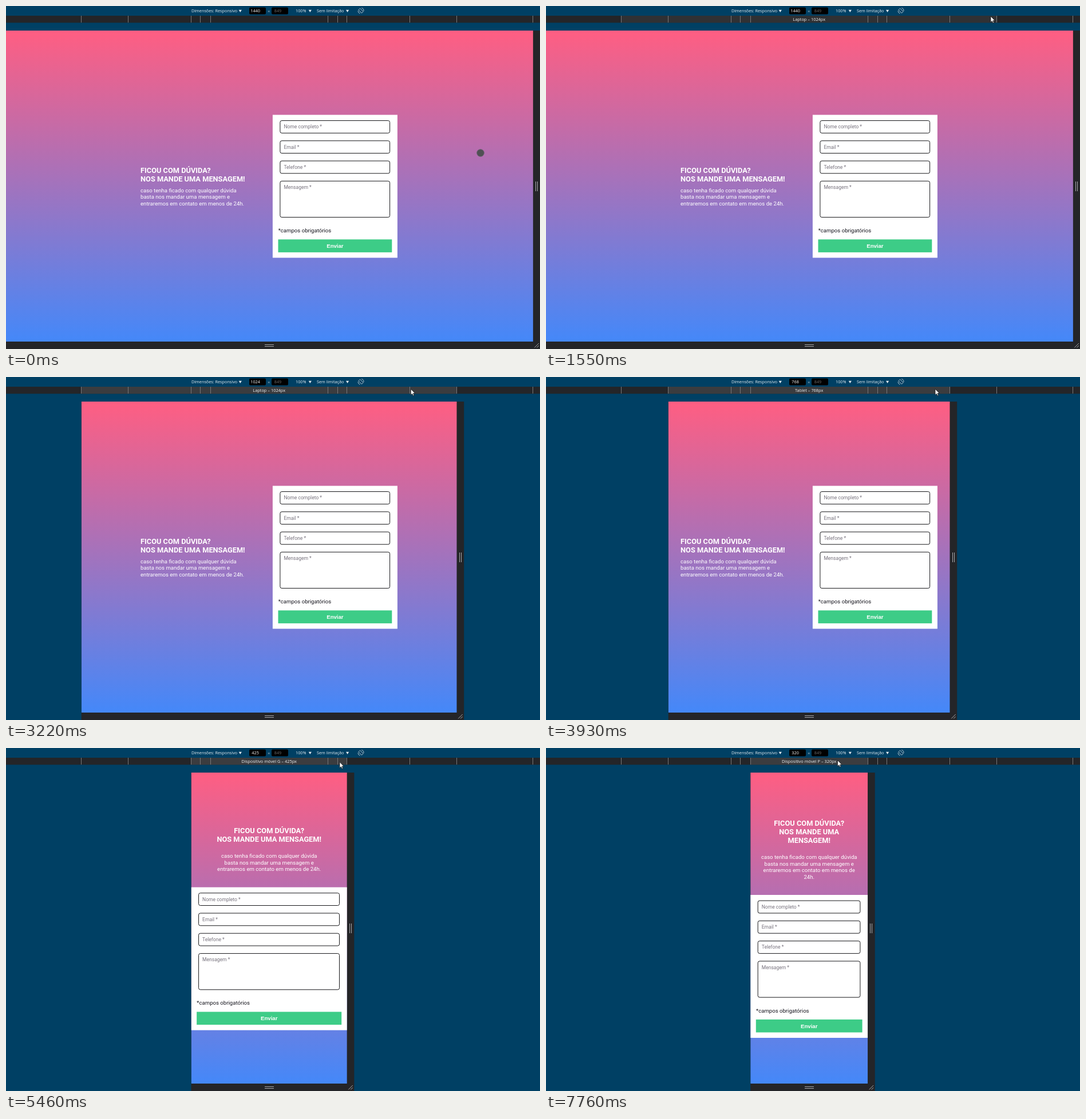
Animation, 933 px wide and 600 px high, one loop 8 s. Source, as an HTML page with a canvas:

```html
<!DOCTYPE html>
<html lang="pt-BR">
<head>
<meta charset="utf-8">
<title>Formulário responsivo</title>
<style>
  html, body { margin: 0; width: 100%; height: 100%; overflow: hidden; background: #004064; }
  canvas { display: block; width: 933px; height: 600px; }
</style>
</head>
<body>
<canvas id="stage" width="933" height="600"></canvas>
<script>
const ctx = document.getElementById('stage').getContext('2d');
const LOOP = 8000, SCALE = 0.6406, MID = 459.7, TOP = 43, BOTTOM = 587;
const UI = '"Open Sans", "Noto Sans", sans-serif';
const BODY = 'Roboto, sans-serif';
const BAR = '#242528', BLUE = '#004064';

const DEVICES = [
  [320, 'Dispositivo móvel P'], [375, 'Dispositivo móvel M'], [425, 'Dispositivo móvel G'],
  [768, 'Tablet'], [1024, 'Laptop'], [1440, 'Laptop G']
];

// time, visible width, width the content is laid out for
const SIZES = [
  [0, 1440, 1440], [2270, 1024, 1440], [2420, 1024, 1024], [3800, 768, 1024], [3930, 768, 768],
  [5460, 425, 425], [6540, 375, 425], [6610, 375, 375], [7680, 320, 375], [7760, 320, 320]
];

// pointer moves: start, end, steps, x, y
const START = [829, 257];
const MOVES = [
  [200, 990, 12, 838, 27], [1120, 1550, 6, 777, 18], [1630, 1770, 3, 762, 21],
  [2780, 3370, 9, 680, 21], [4510, 5020, 8, 582, 17], [5320, 5320, 1, 583, 20],
  [5460, 5460, 1, 583, 24.5], [5890, 6460, 8, 571.5, 24.5], [6830, 7330, 8, 509.5, 21.5]
];

function pointer(t) {
  let [x, y] = START;
  for (const [from, to, steps, nx, ny] of MOVES) {
    if (t < from) break;
    const gap = (to - from) / Math.max(1, steps - 1);
    const k = t >= to ? 1 : (Math.floor((t - from) / gap) + 1) / steps;
    x += (nx - x) * k;
    y += (ny - y) * k;
  }
  return [x, y];
}

const half = width => width * SCALE / 2;

function hovered(t) {
  const [x, y] = pointer(t);
  if (y < 17 || y > 29) return null;
  return DEVICES.find(d => Math.abs(x - MID) <= half(d[0])) || null;
}

function hoverAge(t, device) {
  let age = 0;
  while (age < 160 && t - age > 0 && hovered(t - age - 10) === device) age += 10;
  return age;
}

function rect(x, y, w, h, color) {
  ctx.fillStyle = color;
  ctx.fillRect(x, y, w, h);
}

function rounded(x, y, w, h, r) {
  ctx.beginPath();
  ctx.roundRect(x, y, w, h, r);
}

function text(str, x, y, font, color, align = 'left') {
  ctx.font = font;
  ctx.fillStyle = color;
  ctx.textAlign = align;
  ctx.fillText(str, x, y);
}

function lines(list, x, y, step, font, align) {
  list.forEach((s, i) => text(s, x, y + i * step, font, '#fff', align));
}

function strokes(color, width, ...segments) {
  ctx.strokeStyle = color;
  ctx.lineWidth = width;
  ctx.beginPath();
  for (const [x1, y1, x2, y2] of segments) {
    ctx.moveTo(x1, y1);
    ctx.lineTo(x2, y2);
  }
  ctx.stroke();
}

function caret(x) {
  ctx.fillStyle = '#e3eaf0';
  ctx.beginPath();
  ctx.moveTo(x - 2.6, 6.7);
  ctx.lineTo(x + 2.6, 6.7);
  ctx.lineTo(x, 11);
  ctx.fill();
}

function numberBox(x, value, textX, color) {
  rounded(x, 2.5, 29, 12, 2);
  ctx.fillStyle = '#000';
  ctx.fill();
  text(value, textX, 11.4, '7.3px ' + UI, color, 'center');
}

function rotateIcon() {
  ctx.save();
  ctx.translate(620, 8.3);
  ctx.strokeStyle = '#c9d3da';
  ctx.lineWidth = 0.9;
  ctx.beginPath();
  ctx.arc(0, 0, 5, -1.3, 0.1);
  ctx.moveTo(-5, 0);
  ctx.arc(0, 0, 5, Math.PI, Math.PI - 1.3, true);
  ctx.stroke();
  ctx.rotate(-Math.PI / 4);
  rounded(-2, -4, 4, 8, 0.8);
  ctx.stroke();
  ctx.restore();
}

function toolbar(width) {
  const font = '7.25px ' + UI, ink = '#e8eef2';
  rect(0, 0, 933, 17, BLUE);
  text('Dimensões: Responsivo', 324, 11.4, font, ink);
  caret(409.3);
  numberBox(425, width, 435.6, '#fff');
  text('×', 459.4, 12, '8px ' + UI, '#a9b8c2', 'center');
  numberBox(464, '849', 475, '#6c6c6c');
  text('100%', 506, 11.4, font, ink);
  caret(531.3);
  text('Sem limitação', 543, 11.4, font, ink);
  caret(596.6);
  rotateIcon();
}

function ruler(t) {
  const device = hovered(t);
  rect(0, 17, 933, 12.3, BAR);
  if (device) {
    const h = half(device[0]);
    ctx.globalAlpha = Math.min(1, hoverAge(t, device) / 150);
    rect(MID - h, 17, h * 2, 12.3, '#3b3c3f');
    ctx.globalAlpha = 1;
  }
  for (const [width] of DEVICES) {
    for (const side of [-1, 1]) rect(Math.round(MID + side * half(width) - 0.5), 17, 1, 12, '#77787a');
  }
  if (device) text(`${device[1]} – ${device[0]}px`, MID, 26.2, '7.4px ' + UI, '#f2f2f2', 'center');
}

function field(label, x, y, w, h) {
  rounded(x + 0.5, y + 0.5, w - 1, h - 1, 3);
  ctx.strokeStyle = '#17171a';
  ctx.lineWidth = 1;
  ctx.stroke();
  text(label, x + 7, y + 14.3, '8.54px ' + BODY, '#77727d');
}

function form(x, y, w) {
  rect(x, y, w, 250, '#fff');
  ['Nome completo *', 'Email *', 'Telefone *', 'Mensagem *'].forEach((label, i) =>
    field(label, x + 12.5, y + 9.6 + i * 35.25, w - 25.3, i < 3 ? 22.8 : 64.3));
  text('*campos obrigatórios', x + 9.8, y + 205.6, '9.61px ' + BODY, '#14141c');
  rect(x + 9.6, y + 217.9, w - 19.2, 22.6, '#3dcc87');
  text('Enviar', x + w / 2, y + 232.7, 'bold 9.61px "Liberation Sans", Arial, sans-serif', '#fff', 'center');
}

function content(layout, left) {
  const cx = left + half(layout);
  const narrow = layout === 320, mobile = layout <= 425;
  const title = narrow
    ? ['FICOU COM DÚVIDA?', 'NOS MANDE UMA', 'MENSAGEM!']
    : ['FICOU COM DÚVIDA?', 'NOS MANDE UMA MENSAGEM!'];
  const copy = ['caso tenha ficado com qualquer dúvida', 'basta nos mandar uma mensagem e']
    .concat(narrow ? ['entraremos em contato em menos de', '24h.'] : ['entraremos em contato em menos de 24h.']);
  const x = mobile ? cx : cx - 224.7;
  const align = mobile ? 'center' : 'left';
  const [titleY, copyY, formY] = narrow ? [135.5, 194.2, 257] : mobile ? [149, 192.3, 243.6] : [291.7, 325.8, 190.4];
  lines(title, x, titleY, 15.4, 'bold 12.81px ' + BODY, align);
  lines(copy, x, copyY, 11.53, '9.61px ' + BODY, align);
  if (mobile) form(left, formY, half(layout) * 2);
  else form(cx + 6.2, formY, 218);
}

function viewport(width, layout) {
  const left = MID - half(width), right = MID + half(width), w = right - left;
  rect(left, TOP, w + 12.5, 600 - TOP, BAR);

  ctx.save();
  ctx.beginPath();
  ctx.rect(left, TOP, w, BOTTOM - TOP);
  ctx.clip();
  const fade = ctx.createLinearGradient(0, TOP, 0, BOTTOM);
  fade.addColorStop(0, '#ff5e82');
  fade.addColorStop(1, '#4488f9');
  rect(left, TOP, w, BOTTOM - TOP, fade);
  content(layout, left);
  ctx.restore();

  const grip = '#a8a9ac', gx = Math.round(right + 4) + 0.5;
  strokes(grip, 1, [gx, 307, gx, 324], [gx + 3, 307, gx + 3, 324],
    [452, 592.5, 468, 592.5], [452, 595.5, 468, 595.5],
    [right + 2.5, 597.5, right + 10, 590], [right + 6.5, 597.5, right + 10, 594]);
}

function drawPointer(t) {
  const [x, y] = pointer(t);
  ctx.save();
  ctx.translate(x, y);
  ctx.beginPath();
  if (y > TOP) {
    ctx.arc(0, 0, 6.3, 0, Math.PI * 2);
    ctx.fillStyle = '#505054';
    ctx.strokeStyle = '#66606f';
    ctx.lineWidth = 0.8;
  } else {
    [[0, 0], [0, 10.4], [2.4, 8.2], [4, 11.8], [5.6, 11.1], [4.1, 7.6], [7.2, 7.4]]
      .forEach(p => ctx.lineTo(...p));
    ctx.closePath();
    ctx.fillStyle = '#fff';
    ctx.strokeStyle = '#111';
    ctx.lineWidth = 0.7;
  }
  ctx.fill();
  ctx.stroke();
  ctx.restore();
}

function draw(t) {
  const [, width, layout] = SIZES.filter(s => s[0] <= t).pop();
  rect(0, 0, 933, 600, BLUE);
  toolbar(width);
  ruler(t);
  viewport(width, layout);
  drawPointer(t);
}

const begin = performance.now();
function tick() {
  draw((performance.now() - begin) % LOOP);
  requestAnimationFrame(tick);
}
tick();
</script>
</body>
</html>
```
